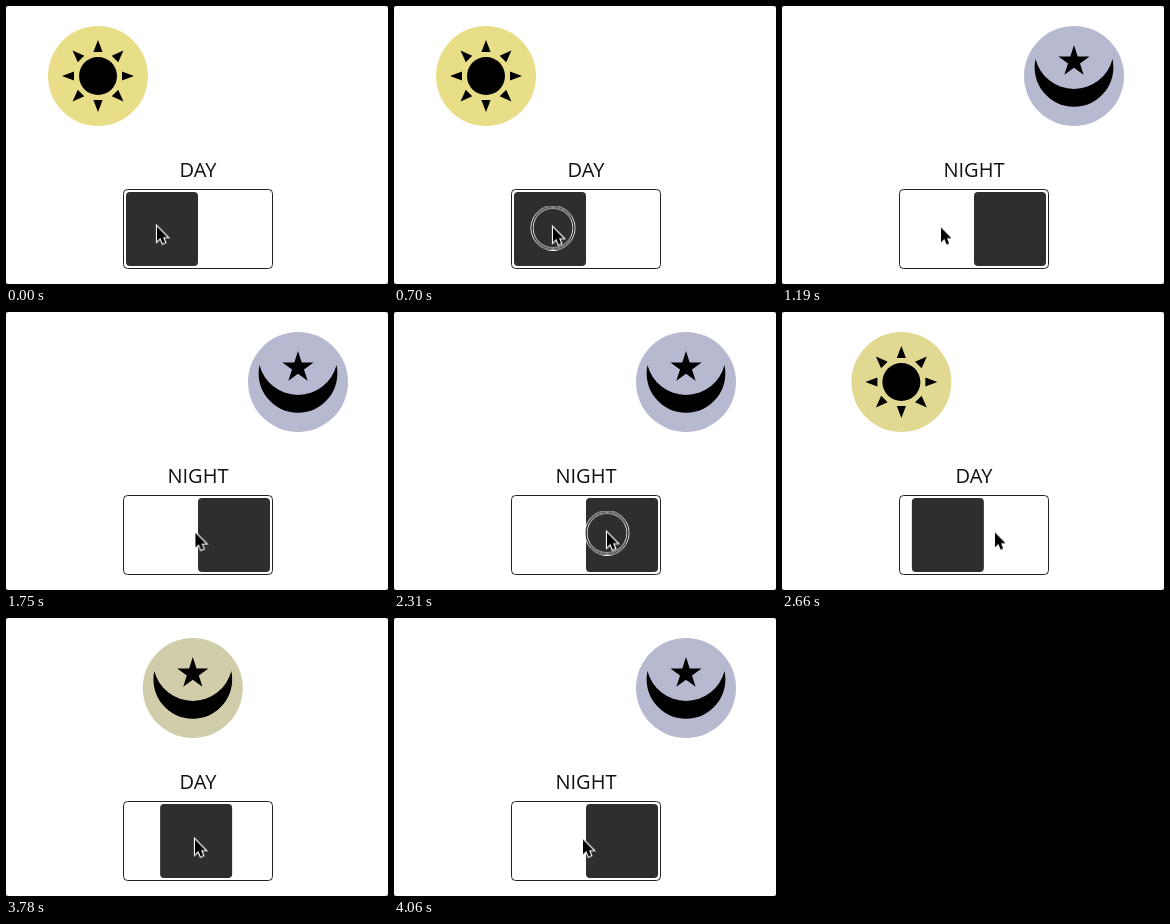
An HTML page for the animation above (5.32 s loop, 382 by 278 pixels).

```html
<!DOCTYPE html>
<html lang="en">
<head>
<meta charset="utf-8">
<title>Day and night toggle</title>
<style>
@property --p { syntax: "<number>"; inherits: true; initial-value: 0; }

html, body { margin: 0; width: 100%; height: 100%; overflow: hidden; background: #666; }
svg { display: block; width: 382px; height: 278px; border-radius: 3px; background: #fff; }

/* Every animation reads the same stepped clock, --t */
svg, .cursor, .ring {
  animation: 5320ms linear calc(var(--t, 0) * -1ms) infinite paused;
}
svg { animation-name: slide, icon, label; animation-timing-function: ease, step-end, step-end; }
.cursor { animation-name: wander; }
.ring { animation-name: press; animation-timing-function: step-end; }

.badge { transform: translate(calc(92px + var(--p) * 200px), 70px); }
.disc { fill: color-mix(in srgb, #b7b9d0 calc(var(--p) * 100%), #e8de88); }
.knob { transform: translateX(calc(var(--p) * 72px)); fill: #2e2e2e; }
.sun { opacity: calc(1 - var(--icon)); }
.moon { opacity: var(--icon); }
.day { opacity: calc(1 - var(--label)); }
.night { opacity: var(--label); }
text { font: 20px "Open Sans", "Noto Sans", sans-serif; text-anchor: middle; fill: #111; }

@keyframes slide {
  0%, 15.207% { --p: 0; }
  21.974%, 46.147% { --p: 1; }
  52.914%, 69.154% { --p: 0; }
  75.921%, 100% { --p: 1; }
}
@keyframes icon {
  0%, 47.18% { --icon: 0; }
  15.6%, 69.55%, 100% { --icon: 1; }
}
@keyframes label {
  0%, 48.5% { --label: 0; }
  18.23%, 72.18%, 100% { --label: 1; }
}
@keyframes press {
  0%, 15.6%, 47.18%, 69.55%, 100% { opacity: 0; }
  12.97%, 43.23%, 66.92% { opacity: 1; }
}
@keyframes wander {
  0% { transform: translate(151px, 220.5px); }
  5.263%, 26.316% { transform: translate(159px, 221.5px); animation-timing-function: ease-in-out; }
  36.842%, 38.158% { transform: translate(202px, 220.5px); }
  40.789%, 51.316% { transform: translate(213px, 220.5px); }
  56.579% { transform: translate(196px, 221px); animation-timing-function: ease-out; }
  61.842%, 100% { transform: translate(189px, 221.5px); }
}
</style>
</head>
<body>
<svg viewBox="0 0 382 278">
  <g class="badge">
    <circle class="disc" r="50"/>
    <g class="sun">
      <circle r="19"/>
      <g id="rays"></g>
    </g>
    <g class="moon">
      <path id="star"/>
      <path d="M-38.5-17A39.4 39.4 0 1 0 38.5-17A39.7 39.7 0 0 1-38.5-17Z"/>
    </g>
  </g>

  <text class="day" x="192" y="171">DAY</text>
  <text class="night" x="192" y="171">NIGHT</text>

  <rect x="117.5" y="183.5" width="149" height="79" rx="4" fill="#fff" stroke="#222"/>
  <rect class="knob" x="120" y="186" width="72" height="74" rx="4"/>

  <g class="cursor">
    <g class="ring" fill="none" stroke="#fff">
      <circle cy=".5" r="22"/>
      <circle cy=".5" r="20"/>
      <circle cy=".5" r="21" stroke="#222"/>
    </g>
    <path d="M0 0V14.8L3.4 11.6L5.6 17L8.2 15.9L6 10.7H10.5Z" stroke="#fff" stroke-width="2.2" paint-order="stroke"/>
  </g>
</svg>
<script>
const LOOP = 5320, STEP = 70, SLACK = 20;
const byId = id => document.getElementById(id);

byId("rays").innerHTML = Array.from({ length: 8 }, (_, i) =>
  `<path d="M0-36L4.6-24H-4.6Z" transform="rotate(${i * 45})"/>`).join("");

const points = Array.from({ length: 10 }, (_, i) => {
  const r = i % 2 ? 6.3 : 16.4, a = i * Math.PI / 5;
  return [r * Math.sin(a), -14.5 - r * Math.cos(a)].map(v => v.toFixed(2));
});
byId("star").setAttribute("d", `M${points.join("L")}Z`);

const start = performance.now();
function tick() {
  const now = (performance.now() - start + SLACK) % LOOP;
  document.documentElement.style.setProperty("--t", Math.floor(now / STEP) * STEP);
  requestAnimationFrame(tick);
}
tick();
</script>
</body>
</html>
```
